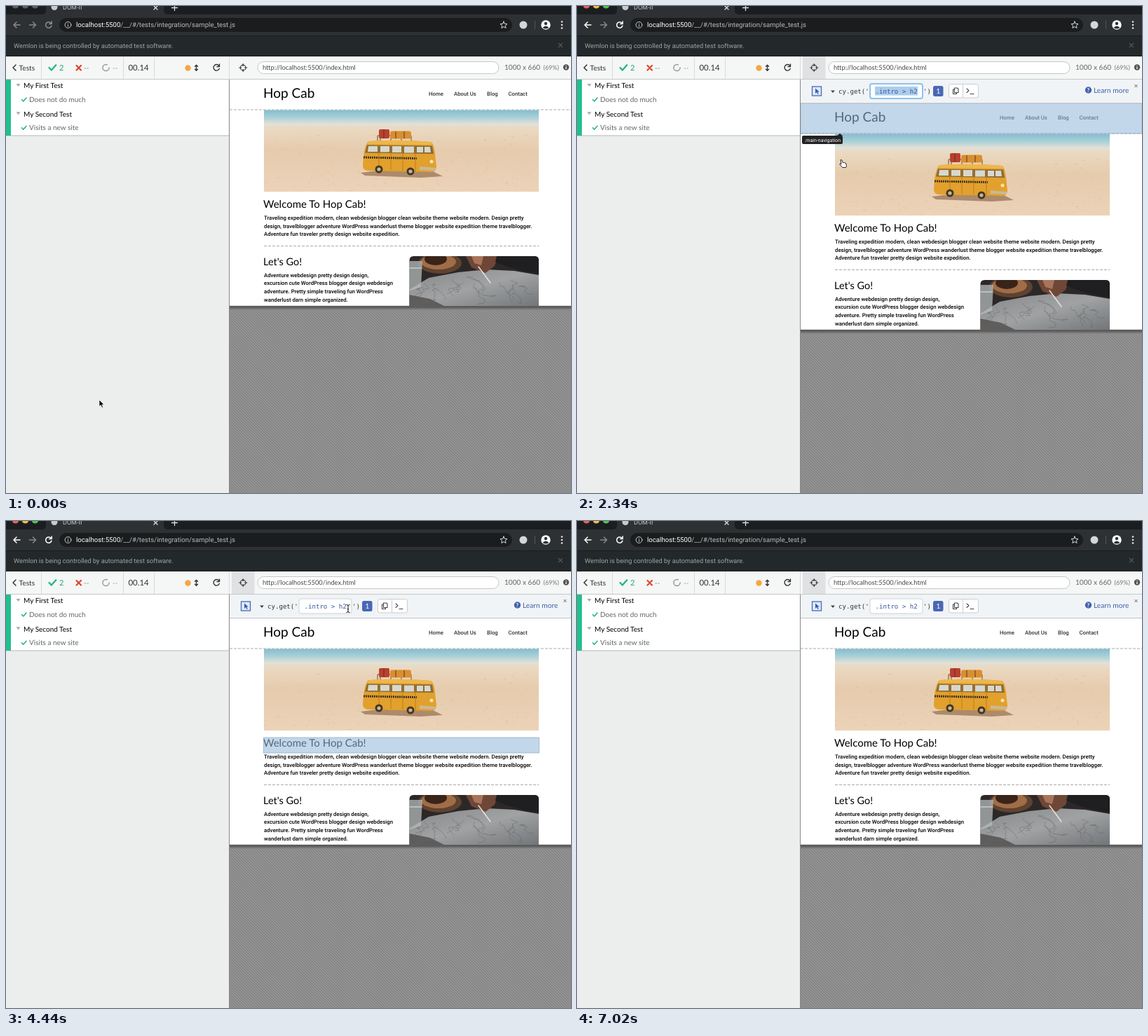
Write an HTML page that moves like this. It is 806x695 px and loops after 7.08 s.

```html
<!DOCTYPE html>
<html lang="en">
<head>
<meta charset="utf-8">
<title>Selector playground</title>
<style>
html, body { margin: 0; width: 100%; height: 100%; overflow: hidden; background: #eceeee; }
svg { display: block; width: 806px; height: 695px; }
text { font: 10px Lato, sans-serif; text-rendering: geometricPrecision; white-space: pre; }
.r { font-family: Roboto, sans-serif; }
.m { font: 9.1px "DejaVu Sans Mono", monospace; }
.copy { font-size: 7.78px; font-weight: 500; }
.head { font-size: 15px; }
.ln { fill: none; stroke-width: 1.5; stroke-linecap: round; stroke-linejoin: round; }
.dash { stroke: #aaa; stroke-dasharray: 4 2; }
.hit { fill: #96b9da; fill-opacity: .57; stroke: #88aac8; stroke-width: .7; }
</style>
</head>
<body>
<svg viewBox="0 0 806 695">
  <defs>
    <pattern id="hatch" width="4" height="4" patternUnits="userSpaceOnUse">
      <rect width="4" height="4" fill="#929292"/>
      <path d="M-1-1L5 5M-1 3L1 5M3-1L5 1" stroke="#7d7d7d"/>
    </pattern>
    <linearGradient id="beach" x2="0" y2="1">
      <stop offset="0" stop-color="#86bccc"/><stop offset=".09" stop-color="#a8d0d9"/>
      <stop offset=".17" stop-color="#e2e0d5"/><stop offset=".24" stop-color="#ead8c0"/>
      <stop offset=".5" stop-color="#e6cbad"/><stop offset="1" stop-color="#ecd3b8"/>
    </linearGradient>
    <linearGradient id="paper" x2="1" y2="1">
      <stop offset="0" stop-color="#85878a"/><stop offset=".5" stop-color="#a0a2a3"/><stop offset="1" stop-color="#737679"/>
    </linearGradient>
    <linearGradient id="shade" x2="0" y2="1">
      <stop offset="0" stop-opacity=".5"/><stop offset="1" stop-opacity="0"/>
    </linearGradient>
    <clipPath id="photo"><path d="M575.500 428V363q0-6 6-6h172.500q6 0 6 6v65z"/></clipPath>
    <path id="tick" class="ln" d="M-3 0l2.2 2.4L3.5-2.5"/>
  </defs>

  <!-- gray stage -->
  <rect x="318" y="104" width="488" height="591" fill="url(#hatch)"/>

  <!-- website -->
  <g id="page">
    <rect x="319" y="428" width="487" height="6" fill="url(#shade)"/>
    <path d="M319 105h487v323H319z" fill="#fff"/>
    <path d="M319 428.3h487" stroke="#666"/>
    <text x="367" y="131" style="font-size:19px">Hop Cab</text>
    <g class="r" fill="#333" id="nav"></g>
    <path class="dash" d="M319 148h487M368 342.5h392"/>
    <path d="M368 148.5h392V265H368z" fill="url(#beach)"/>
    <g id="sand" fill="#b98f66"></g>
    <g id="van">
      <path d="M506 238q50-7 101-3l16 8-31 2-80-3z" fill="#8c6645" opacity=".65"/>
      <path d="M530 192v-7h48v8M534 184v8m15-8v8m15-8v8" class="ln" stroke="#6b4a2c" style="stroke-width:1"/>
      <rect x="532" y="176" width="15" height="13" rx="2" fill="#b9402f"/>
      <rect x="548" y="178.500" width="30" height="11" rx="3" fill="#d98f30"/>
      <path d="M539 176v13m17-10v10m12-10v10" stroke="#5c3526"/>
      <path d="M518 193q45-3 88 1 4 1 6 17l2 18q0 7-7 8l-91-2q-7-1-7-7l1-14q3-20 8-21z" fill="#e2a02c"/>
      <path d="M518 193q45-3 88 1l3 4-94-1z" fill="#eeb74c"/>
      <path d="M515 198.500l93 1 2 11.500-98-1.500z" fill="#8d6b35"/>
      <path d="M517 200h13v8h-14zm17 0h13v8.500h-13zm17 0h13v9h-13zm17 .5h14v9h-14zm18 .5h9v8h-9zm11 0h8l1 8h-9z" fill="#d6d8cf"/>
      <path d="M510 216l76 1.500" stroke="#3c3022" stroke-width="3" stroke-dasharray="2 1"/>
      <path d="M532 199v34m17-34v35m17-34v35m18-35v36" stroke="#b67816" stroke-width=".8"/>
      <path d="M590 229l23 2v4l-23-1z" fill="#c9b896"/>
      <circle cx="607" cy="222" r="2.5" fill="#f5e4b0"/>
      <g fill="#413628"><circle cx="532" cy="233" r="5.500"/><circle cx="577" cy="236" r="5.500"/></g>
      <g fill="#cbb58d"><circle cx="532" cy="233" r="2.6"/><circle cx="577" cy="236" r="2.6"/></g>
    </g>
    <text class="head" x="367" y="288">Welcome To Hop Cab!</text>
    <g class="r" id="intro"></g>
    <text class="head" x="367" y="370" style="font-size:14.5px">Let's Go!</text>
    <g class="r" id="go"></g>
    <g clip-path="url(#photo)">
      <path d="M575 357h185v71H575z" fill="#2c2827"/>
      <path d="M575 405l28-17 42-8 40-4 40 2 35 6v44H575z" fill="url(#paper)"/>
      <path d="M575 412l30 6 20 10h-50z" fill="#45423f" opacity=".7"/>
      <g id="roads" class="ln" stroke="#55585b" style="stroke-width:.6" opacity=".6"></g>
      <ellipse cx="619" cy="367" rx="31" ry="15" fill="#5f4230"/>
      <ellipse cx="617" cy="365" rx="25" ry="11" fill="#a06d47"/>
      <ellipse cx="613" cy="361" rx="16" ry="9" fill="#3a241a"/>
      <path d="M656 357h46l-5 14-13 10-20-8z" fill="#6f4737"/>
      <path d="M664 357h17l-3 13-10-3z" fill="#a8755a"/>
      <path d="M700 357h60v25q-34-4-62-17z" fill="#1f1e20"/>
      <path d="M674 372l17 23" class="ln" stroke="#e6e2da"/>
      <path d="M575 364h19l-2 37-17 6z" fill="#b5babb" opacity=".75"/>
      <path d="M575 374h18" stroke="#e5e8e8"/>
    </g>
  </g>

  <!-- element highlight -->
  <g id="highlight">
    <rect class="hit" id="hit"/>
    <g id="label">
      <rect id="labelBox" height="12" rx="2" fill="#222"/>
      <path id="labelTip" d="M-4 0h8l-4 3z" fill="#222"/>
      <text id="labelText" class="r" fill="#fff" style="font-size:7px"/>
    </g>
  </g>

  <!-- selector playground -->
  <g id="panel">
    <path d="M319 105h487v33.5H319z" fill="#f1f4f6"/><path d="M319 138.7h487" stroke="#c9ced2"/>
    <rect x="335.5" y="115" width="13" height="13" fill="#dcebfb" stroke="#4a69b5" stroke-width="1.3"/>
    <path d="M340 117.5v7.5l2-2 1.4 3 1.3-.6-1.4-2.8h2.5z" fill="#3c5aa8"/>
    <path d="M362 120.5h6l-3 3.5z" fill="#444"/>
    <text class="m" x="373" y="125" fill="#333">cy.get('</text>
    <rect id="field" x="418" y="111" width="75" height="21" rx="3" fill="#fff"/>
    <rect id="selected" x="425" y="115" width="61" height="12.5" fill="#aacdec"/>
    <text class="m" x="425.5" y="124.6" fill="#38599b">.intro &gt; h2</text>
    <text class="m" x="494" y="125" fill="#333">')</text>
    <rect x="508" y="114" width="14.5" height="15" rx="2.5" fill="#4967b4"/>
    <text x="512.5" y="125" fill="#fff">1</text>
    <rect x="530.5" y="111.5" width="42" height="19.5" rx="3" fill="#fff" stroke="#ccc"/>
    <path d="M550.5 112v19" stroke="#ccc"/>
    <path d="M538.5 117h4l1.5 1.5v5h-5.5zM538 119h-1.5v6.5h5v-1.5M556 118l3 2.7-3 2.8m5 2h5" class="ln" stroke="#444" style="stroke-width:1.1"/>
    <circle cx="729.5" cy="120" r="4.7" fill="#4361ad"/>
    <text x="727.5" y="123" fill="#fff" style="font-size:8px;font-weight:bold">?</text>
    <text x="737" y="123.5" fill="#405fab" style="font-size:10.2px">Learn more</text>
    <path d="M795.5 112l4 4m0-4l-4 4" stroke="#666"/>
  </g>

  <!-- test list -->
  <path d="M0 104h318v591H0z" fill="#eceeee"/>
  <path d="M0 105h318v79.5H0z" fill="#fff"/><path d="M0 185h318" stroke="#b9bcbc"/>
  <path d="M0 105h7v80H0z" fill="#22bf8d"/>
  <g id="tests"></g>
  <path d="M318.5 72v623" stroke="#888"/>

  <!-- runner toolbar -->
  <path d="M0 71h806v33.5H0z" fill="#f5f6f6"/><path d="M0 104.5h806" stroke="#c5c8c8"/>
  <path d="M50.5 72v32m117-32v32m44-32v32m107-32v32" stroke="#d8dbdb"/>
  <path d="M14 84l-4 4 4 4" class="ln" stroke="#333"/>
  <text x="18.5" y="91.5" fill="#333" style="font-size:10.2px">Tests</text>
  <use href="#tick" transform="translate(66 88)scale(1.5)" stroke="#20b385"/>
  <text x="76" y="92" fill="#25a37c" style="font-size:11px">2</text>
  <path d="M100.5 85l6.5 6.5m0-6.5l-6.5 6.5" class="ln" stroke="#d9482b" style="stroke-width:2.2"/>
  <text x="111" y="91.5" fill="#777">--</text>
  <circle cx="142.5" cy="88" r="4.6" class="ln" stroke="#999" stroke-dasharray="23 6"/>
  <text x="152" y="91.5" fill="#999">--</text>
  <text x="174.5" y="91.5" fill="#333" style="font-size:11.4px">00.14</text>
  <circle cx="259.5" cy="88.5" r="4.2" fill="#f5a742"/>
  <path d="M271.5 84.5v7.5m-2-5.8l2-2 2 2m-4 4l2 2 2-2M304 85.5a4.3 4.3 0 1 0 .3 4M304.5 83v3.5H301" class="ln" stroke="#333" style="stroke-width:1.4"/>
  <rect id="aimBack" x="322" y="72" width="32.5" height="32" fill="#dfe1e2"/>
  <path d="M342 88a3.8 3.8 0 1 1-7.6 0a3.8 3.8 0 1 1 7.6 0M338.2 82.5v3m0 5v3m-5.5-5.5h3m5 0h3" class="ln" stroke="#333" style="stroke-width:1.2"/>
  <rect x="359" y="79.5" width="344" height="17" rx="8.5" fill="#fff" stroke="#c5c7c8"/>
  <text x="366" y="91" fill="#444" style="font-size:9.3px">http://localhost:5500/index.html</text>
  <text x="711" y="91" fill="#666" style="font-size:10.1px">1000 x 660</text>
  <text x="766.5" y="91" fill="#777" style="font-size:9px">(69%)</text>
  <circle cx="799" cy="87.5" r="4.2" fill="#555"/><path d="M799 87v3m0-5v.9" stroke="#fff" stroke-width="1.3"/>

  <!-- browser window -->
  <path d="M0 0h806v72H0z" fill="#23282a"/>
  <path d="M0 0h806v12H0z" fill="#1b1e20"/>
  <path d="M0 12h51q6 0 6-6V0h168v6q0 6 6 6h575v30H0z" fill="#2d3133"/>
  <path d="M0 42.5h806M0 71.5h806" stroke="#191c1d"/>
  <g id="lights"><circle cx="13.5" cy="-1" r="4.6"/><circle cx="27.5" cy="-1" r="4.6"/><circle cx="41.5" cy="-1" r="4.6"/></g>
  <circle cx="69" cy="1.5" r="4.5" fill="#c8cbcd"/>
  <text class="r" x="81" y="5" fill="#c6c9ca" style="font-size:9px">DOM-II</text>
  <path d="M211 0l5 5m0-5l-5 5M236.5 2.5h8m-4-4v8" class="ln" stroke="#ddd" style="stroke-width:1.3"/>
  <g id="controls" class="ln">
    <path d="M20 27h-9m4-4l-4 4 4 4M64.5 25a4.2 4.2 0 1 0 .4 3.3M65.2 22v3.4h-3.4"/>
  </g>
  <path d="M33.5 27h9m-4-4l4 4-4 4" class="ln" stroke="#85898b"/>
  <rect x="76" y="17" width="646" height="20" rx="10" fill="#1a1c1d"/>
  <circle cx="88.5" cy="27" r="4.4" class="ln" stroke="#ccc" style="stroke-width:1"/><path d="M88.5 26.5v3m0-5v1" stroke="#ccc"/>
  <text class="r" x="100" y="30.3" fill="#b7babb" style="font-size:9.65px"><tspan fill="#fff">localhost:5500</tspan>/__/#/tests/integration/sample_test.js</text>
  <path d="M710 22l1.4 3.3 3.6.3-2.7 2.4.8 3.5-3.1-1.9-3.1 1.9.8-3.5-2.7-2.4 3.6-.3z" class="ln" stroke="#d4d6d7" style="stroke-width:1"/>
  <circle cx="738" cy="27" r="5.5" fill="#d4d6d7"/><path d="M754.5 21v12" stroke="#555"/>
  <circle cx="770" cy="27" r="6.7" fill="#fff"/><circle cx="770" cy="25" r="2.2" fill="#2d3133"/><path d="M765.5 31q4.5-5 9 0-4.5 3-9 0" fill="#2d3133"/>
  <g fill="#e5e5e5"><circle cx="793" cy="22.5" r="1.3"/><circle cx="793" cy="27" r="1.3"/><circle cx="793" cy="31.5" r="1.3"/></g>
  <text class="r" x="11" y="59.5" fill="#a0a4a5" style="font-size:9.2px">Wemlon is being controlled by automated test software.</text>
  <path d="M788 53l6 6m0-6l-6 6" stroke="#51575a" stroke-width="1.2"/>

  <g id="tip">
    <path d="M333 108l4-4 4 4z" fill="#111"/><rect x="281" y="107.5" width="114" height="17.5" rx="2.5" fill="#111"/>
    <text x="285.5" y="119.3" fill="#fff" style="font-size:9.2px">Open Selector Playground</text>
  </g>

  <g id="cursor">
    <path id="arrow" d="M0 0v9.5l2.2-2 1.6 3.8 1.7-.7-1.6-3.7h3z" fill="#000" stroke="#fff" stroke-width=".7"/>
    <path id="hand" d="M1 .8q1.2-1 2 .3l1.2 3.5q.9-.7 1.5.1.9-.6 1.5.3 1-.4 1.5.8l.7 3q.2 1.5-.8 2.7H3.8L.2 7.5q-1-1.2 0-1.6l1.8 1z" fill="#fff" stroke="#111" stroke-width=".9" stroke-linejoin="round"/>
    <path id="beam" d="M-2.5-5.5q2.5 0 2.5 1.5v8q0 1.5-2.5 1.5M2.5-5.5Q0-5.5 0-4m0 8q0 1.5 2.5 1.5M-1 .8h2" fill="none" stroke="#111"/>
  </g>
</svg>

<script>
const $ = id => document.getElementById(id);
const show = (id, on) => $(id).style.display = on ? '' : 'none';
const set = (id, attrs) => { for (const k in attrs) $(id).setAttribute(k, attrs[k]); };
const label = (x, y, s, cls = '') => `<text class="${cls}" x="${x}" y="${y}">${s}</text>`;
const lines = (id, y, rows) => $(id).innerHTML = rows.map((s, i) => label(368, y + i * 11.7, s, 'r copy')).join('');

lines('intro', 305, [
  'Traveling expedition modern, clean webdesign blogger clean website theme website modern. Design pretty',
  'design, travelblogger adventure WordPress wanderlust theme blogger website expedition theme travelblogger.',
  'Adventure fun traveler pretty design website expedition.']);
lines('go', 386.5, [
  'Adventure webdesign pretty design design,',
  'excursion cute WordPress blogger design webdesign',
  'adventure. Pretty simple traveling fun WordPress',
  'wanderlust darn simple organized.']);
$('nav').innerHTML = [[603, 'Home'], [639, 'About Us'], [686, 'Blog'], [716.5, 'Contact']]
  .map(([x, s]) => label(x, 128, s, 'r copy')).join('');
$('tests').innerHTML = [['My First Test', 'Does not do much'], ['My Second Test', 'Visits a new site']]
  .map(([title, test], i) => `<g transform="translate(0 ${i * 40.3})">
    <path d="M14.5 111h6l-3 4z" fill="#aaa"/>${label(25, 117.3, title)}
    <use href="#tick" x="25.5" y="133.5" stroke="#20b385"/><g fill="#666">${label(33, 137, test)}</g></g>`).join('');

// seeded texture for the two pictures
let seed = 7;
const rnd = () => (seed = seed * 16807 % 2147483647) / 2147483647;
let grains = '', roads = '';
for (let i = 0; i < 160; i++)
  grains += `<rect x="${368 + rnd() * 390}" y="${182 + rnd() * 82}" width="${1 + rnd() * 2}" height=".8" opacity=".25"/>`;
for (let i = 0; i < 16; i++) {
  roads += `<path d="M${590 + rnd() * 155} ${385 + rnd() * 20}`;
  for (let j = 0; j < 6; j++) roads += `l${rnd() * 20 - 10} ${rnd() * 9 - 1}`;
  roads += '"/>';
}
$('sand').innerHTML = grains;
$('roads').innerHTML = roads;

const LOOP = 7080, STEP = 60;
const FOCUS = 400, HOVER = 900, OPEN = 1500, PICK = 3750, CLEAR = 6250;
const path = [[0, 133, 562], [180, 133, 562], [960, 345, 90], [1500, 345, 90], [2040, 370, 180],
  [2340, 375, 219], [2800, 382, 268], [3300, 388, 324], [3840, 388, 324], [4380, 488, 125],
  [5280, 488, 125], [5880, 437, 155], [6000, 437, 155], [6480, 330, 220], [7020, 34, 682]];
const targets = [
  { from: 1860, x: 319, y: 139, w: 487, h: 43, name: '.main-navigation', lx: 321, ly: 185, lw: 58, tip: 'translate(375 185)scale(1 -1)' },
  { from: 2400, x: 368, y: 182, w: 392, h: 117, name: '.intro > img', lx: 367, ly: 165, lw: 43, tip: 'translate(402 177)' },
  { from: 3060, x: 367.5, y: 309, w: 393, h: 22, name: '.intro > h2', lx: 367, ly: 292, lw: 38, tip: 'translate(401 304)' }];

function pointer(t) {
  let i = 1;
  while (i < path.length - 1 && t > path[i][0]) i++;
  const [a, x, y] = path[i - 1], [b, u, v] = path[i];
  const k = Math.min(1, (t - a) / (b - a)), e = k * k * (3 - 2 * k);
  return [x + (u - x) * e, y + (v - y) * e];
}

function draw(t) {
  const active = t >= FOCUS, open = t >= OPEN, picking = t < PICK;
  ['#ed5f56', '#f5bd3f', '#50c453'].forEach((c, i) => $('lights').children[i].setAttribute('fill', active ? c : '#5c6062'));
  set('controls', { stroke: active ? '#fff' : '#888d8f' });
  set('page', { transform: `translate(0 ${open ? 34 : 0})` });
  show('panel', open);
  show('aimBack', t >= HOVER);
  show('tip', t >= HOVER && t < OPEN + 60);
  show('selected', picking);
  set('field', { stroke: picking ? '#8fc1ee' : '#ccd2d8', 'stroke-width': picking ? 2 : 1 });

  const hit = t < CLEAR && targets.filter(a => t >= a.from).pop();
  show('highlight', hit);
  show('label', hit && picking);
  if (hit) {
    set('hit', { x: hit.x, y: hit.y, width: hit.w, height: hit.h });
    set('labelBox', { x: hit.lx, y: hit.ly, width: hit.lw });
    set('labelTip', { transform: hit.tip });
    set('labelText', { x: hit.lx + 3.5, y: hit.ly + 8.5 });
    $('labelText').textContent = hit.name;
  }

  const beam = t >= 4320 && t < 5400;
  const hand = !beam && t >= HOVER && t < 6120;
  show('beam', beam);
  show('hand', hand);
  show('arrow', !beam && !hand);
  show('cursor', t < 7020);
  set('cursor', { transform: `translate(${pointer(t)})` });
}

const start = performance.now();
function frame() {
  const t = (performance.now() - start) % LOOP;
  draw(Math.floor(t / STEP) * STEP);
  requestAnimationFrame(frame);
}
frame();
</script>
</body>
</html>
```
